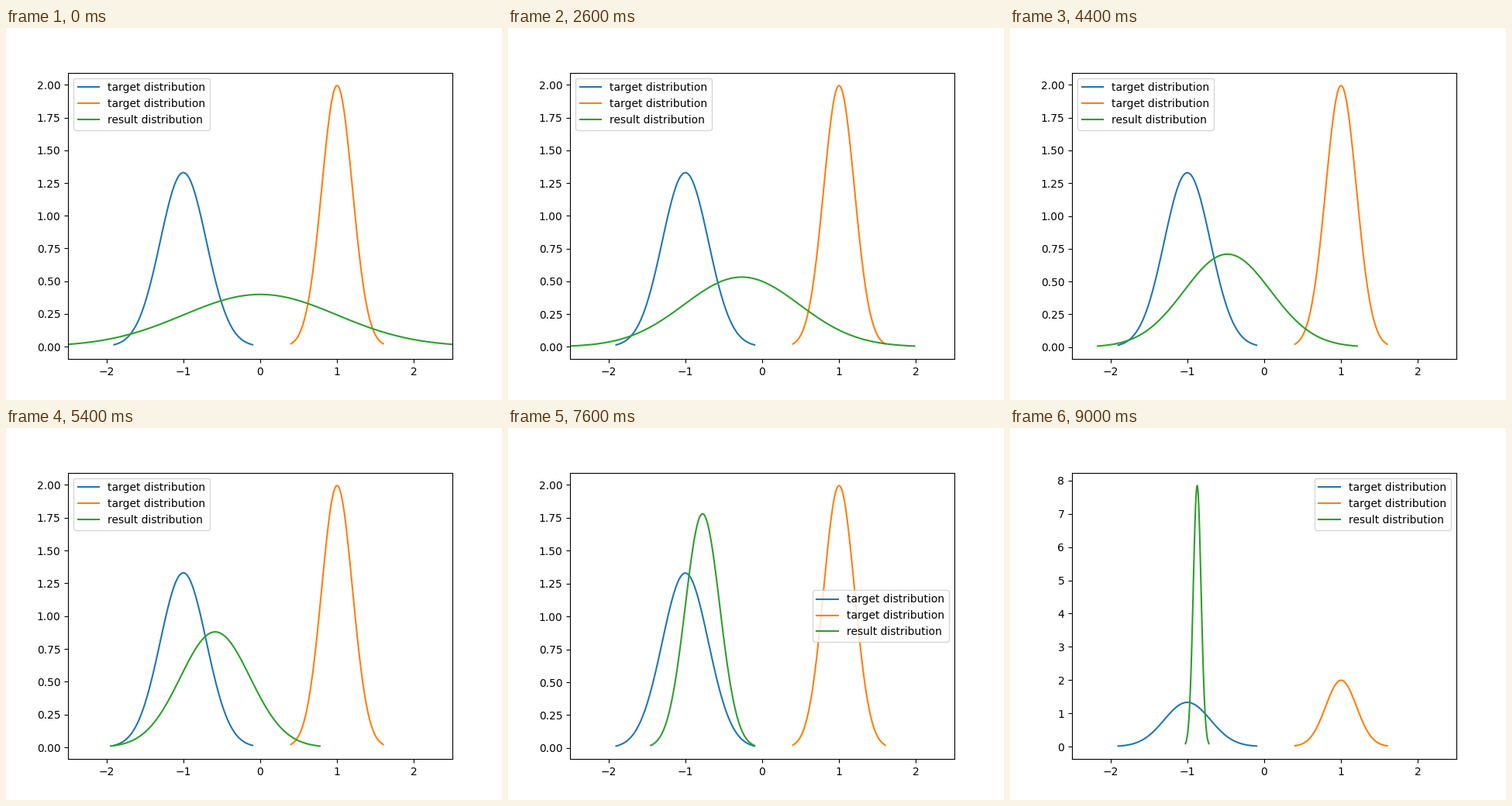
Write a matplotlib script that moves like this. It is 640 px wide and 480 px high and loops after 9100 ms.

```python
import numpy as np
import matplotlib.pyplot as plt
from matplotlib.animation import FuncAnimation

FRAMES = 91
INTERVAL = 100

# Progress of the fitted normal: step, mean, standard deviation
STEPS = np.array([0, 11, 26, 44, 64, 76, 90], float)
MEANS = np.array([0, -0.102, -0.266, -0.479, -0.680, -0.776, -0.872])
SIGMAS = np.array([1, 0.8925, 0.749, 0.5627, 0.3452, 0.2241, 0.0508])


def smooth(t, xs, ys):
    """Cubic Hermite interpolation through the points (xs, ys)."""
    slopes = np.gradient(ys, xs)
    i = min(np.searchsorted(xs, t, side="right") - 1, len(xs) - 2)
    h = xs[i + 1] - xs[i]
    u = (t - xs[i]) / h
    return ((1 + 2 * u) * (1 - u) ** 2 * ys[i]
            + u * (1 - u) ** 2 * h * slopes[i]
            + u * u * (3 - 2 * u) * ys[i + 1]
            + u * u * (u - 1) * h * slopes[i + 1])


def bell(mu, sigma):
    x = np.linspace(mu - 3 * sigma, mu + 3 * sigma, 100)
    y = np.exp(-0.5 * ((x - mu) / sigma) ** 2) / (sigma * np.sqrt(2 * np.pi))
    return x, y


fig, ax = plt.subplots(figsize=(6.4, 4.8), dpi=100)
ax.plot(*bell(-1, 0.3), label="target distribution")
ax.plot(*bell(1, 0.2), label="target distribution")
result, = ax.plot(*bell(0, 1), label="result distribution")
ax.set_xlim(-2.5, 2.5)
ax.legend(loc="best")


def update(step):
    mu = smooth(step, STEPS, MEANS)
    sigma = smooth(step, STEPS, SIGMAS)
    result.set_data(*bell(mu, sigma))
    ax.relim()
    ax.autoscale_view(scalex=False)
    return result,


anim = FuncAnimation(fig, update, frames=FRAMES, interval=INTERVAL,
                     init_func=lambda: update(0), repeat=True, repeat_delay=0)
plt.show()
```
